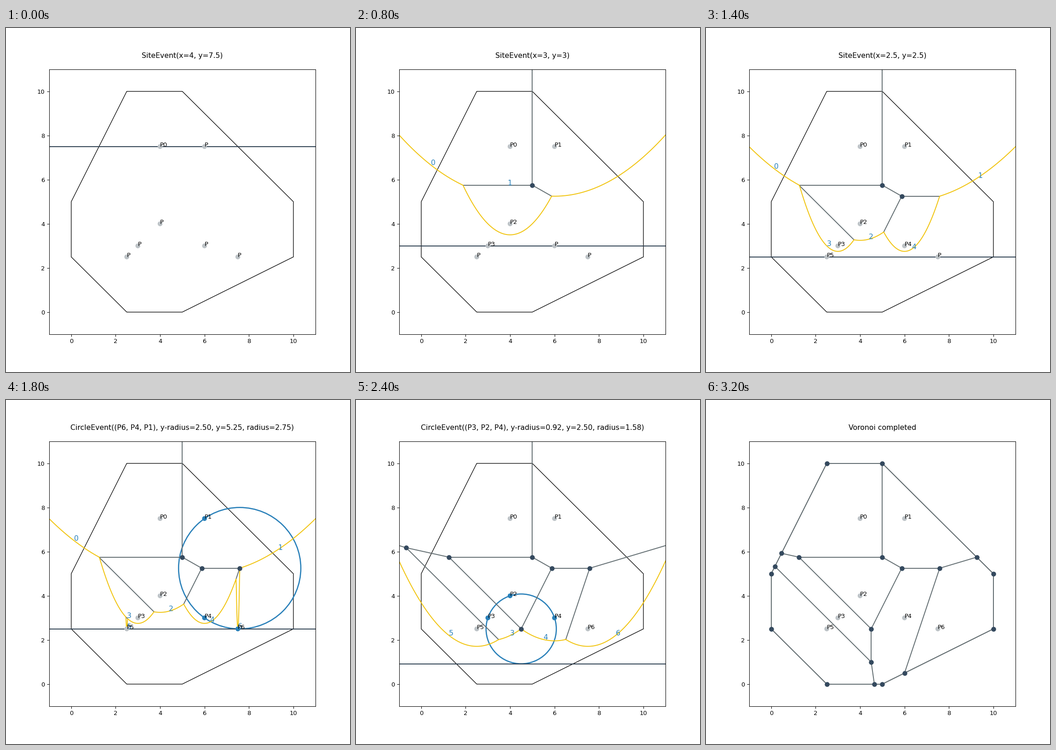
Write a matplotlib script that moves like this. It is 748 by 748 pixels and loops after 3400 ms.

```python
import numpy as np
import matplotlib.pyplot as plt
from matplotlib.animation import FuncAnimation
from matplotlib.patches import Circle, Polygon

plt.rcParams["font.family"] = "DejaVu Sans"

SWEEP, VERTEX, BEACH = "#2c3e50", "#34495e", "#f1c40f"
EDGE, ACTIVE, SITE = "#636e72", "#2980b9", "#bdc3c7"
LOW, HIGH = -1, 11

SITES = [(4, 7.5), (6, 7.5), (4, 4), (3, 3), (6, 3), (2.5, 2.5), (7.5, 2.5)]
BORDER = [(2.5, 10), (5, 10), (10, 5), (10, 2.5), (5, 0), (2.5, 0), (0, 2.5), (0, 5)]
# An integer is a site event, a triple is a circle event.
EVENTS = [0, 1, 2, (2, 0, 1), 3, 4, (2, 1, 4), 5, 6, (6, 4, 1),
          (0, 2, 3), (0, 3, 5), (3, 2, 4), (5, 3, 4), (5, 4, 6)]
SPLIT_PAIRS = [(0, 1), (0, 2), (2, 3), (1, 4), (3, 5), (4, 6)]
ARC_ORDER = {4: (0, 3, 1, 2)}  # storage order of the arcs, where unsorted


def circumcircle(triple):
    a, b, c = (np.array(SITES[i], float) for i in triple)
    m = 2 * np.array([b - a, c - a])
    center = np.linalg.solve(m, [b @ b - a @ a, c @ c - a @ a])
    return center, np.hypot(*(center - a))


def parabola(site, x, sweep):
    px, py = SITES[site]
    return (x - px) ** 2 / (2 * (py - sweep)) + (py + sweep) / 2


def breakpoint_at(left, right, sweep):
    """Point where the arc of `left` hands over to the arc of `right`."""
    coefs = []
    for px, py in (SITES[left], SITES[right]):
        k = 1 / (2 * (py - sweep))
        coefs.append(np.array([k, -2 * px * k, px * px * k + (py + sweep) / 2]))
    a, b, c = coefs[0] - coefs[1]
    if abs(a) < 1e-12:
        x = -c / b
    else:
        x = (-b + np.sqrt(max(b * b - 4 * a * c, 0))) / (2 * a)
    return x, parabola(left, x, sweep)


def sweep_of(event):
    if isinstance(event, int):
        return SITES[event][1]
    center, radius = circumcircle(event)
    return center[1] - radius


def title_of(event):
    if isinstance(event, int):
        x, y = SITES[event]
        return f"SiteEvent(x={x:g}, y={y:g})"
    center, radius = circumcircle(event)
    names = ", ".join(f"P{i}" for i in event)
    return (f"CircleEvent(({names}), y-radius={center[1] - radius:.2f}, "
            f"y={center[1]:.2f}, radius={radius:.2f})")


def diagram(events, sweep):
    """Vertices found so far and the edges as they stand at this sweep line."""
    ends = {(1, 0): (5, 99)}
    vertices = []
    pairs = {p for p in SPLIT_PAIRS if SITES[p[1]][1] > sweep}
    for event in events:
        if isinstance(event, int):
            continue
        left, mid, right = event
        center = tuple(circumcircle(event)[0])
        vertices.append(center)
        for pair in ((left, mid), (mid, right), (right, left)):
            ends[pair] = center
            pairs.add(tuple(sorted(pair)))

    def end(a, b):
        return ends[a, b] if (a, b) in ends else breakpoint_at(a, b, sweep)

    return vertices, [(end(a, b), end(b, a)) for a, b in sorted(pairs)]


def clip_to_border(start, stop):
    start, stop = np.array(start, float), np.array(stop, float)
    step, enter, leave = stop - start, 0.0, 1.0
    for p, q in zip(BORDER, BORDER[1:] + BORDER[:1]):
        inward = np.array([q[1] - p[1], p[0] - q[0]])
        distance, slope = inward @ (start - p), inward @ step
        if abs(slope) < 1e-9:
            if distance < 0:
                return None
        elif slope > 0:
            enter = max(enter, -distance / slope)
        else:
            leave = min(leave, -distance / slope)
    if enter >= leave:
        return None
    return tuple(start + enter * step), tuple(start + leave * step)


def finished_diagram():
    _, edges = diagram(EVENTS, sweep_of(EVENTS[-1]))
    edges = [e for e in (clip_to_border(*edge) for edge in edges) if e]
    points = {tuple(np.round(p, 6) + 0.0) for edge in edges for p in edge}
    points |= {(float(x), float(y)) for x, y in BORDER}
    return sorted(points), edges + list(zip(BORDER, BORDER[1:] + BORDER[:1]))


def draw_beach(step, sweep):
    seen = sum(isinstance(e, int) for e in EVENTS[:step + 1])
    order = ARC_ORDER.get(step, range(seen))
    arcs = [i for i in order if SITES[i][1] > sweep]
    if not arcs:
        return
    x = np.linspace(LOW, HIGH, 1000)
    curves = np.array([parabola(i, x, sweep) for i in arcs])
    ax.plot(x, curves.min(axis=0), color=BEACH)
    lowest = curves.argmin(axis=0)
    for slot, name in enumerate(order):
        region = x[lowest == slot]
        if len(region) and name in arcs:
            middle = np.median(region)
            ax.text(middle, parabola(name, middle, sweep), str(name),
                    color=ACTIVE, fontsize=12, zorder=15)


def draw(step):
    ax.clear()
    running = step < len(EVENTS)
    event = EVENTS[step] if running else None
    done = EVENTS[:step + 1]
    active = ()

    if step > len(EVENTS):
        title = "Voronoi completed"
        vertices, edges = finished_diagram()
    else:
        title = title_of(event) if running else "Sweep finished"
        sweep = sweep_of(done[-1])
        vertices, edges = diagram(done, sweep)

    ax.add_patch(Polygon(BORDER, fill=False, edgecolor="black"))
    for start, stop in edges:
        ax.plot(*zip(start, stop), color=EDGE)
    if running:
        draw_beach(step, sweep)
        ax.axhline(sweep, color=SWEEP)
        if not isinstance(event, int):
            active = event
            center, radius = circumcircle(event)
            ax.add_patch(Circle(center, radius, fill=False, color=ACTIVE, linewidth=2))

    if vertices:
        ax.scatter(*zip(*vertices), s=50, color=VERTEX, zorder=10)
    ax.scatter(*zip(*SITES), s=50, zorder=10,
               color=[ACTIVE if i in active else SITE for i in range(len(SITES))])
    for i, (x, y) in enumerate(SITES):
        ax.text(x, y, f"P{i}" if i in done else "P", zorder=15)

    ax.set_xlim(LOW, HIGH)
    ax.set_ylim(LOW, HIGH)
    ax.set_title(title + "\n")
    return []


fig, ax = plt.subplots(figsize=(8, 8), dpi=93.5)
animation = FuncAnimation(fig, draw, frames=len(EVENTS) + 2, interval=200, repeat=True)
plt.show()
```
